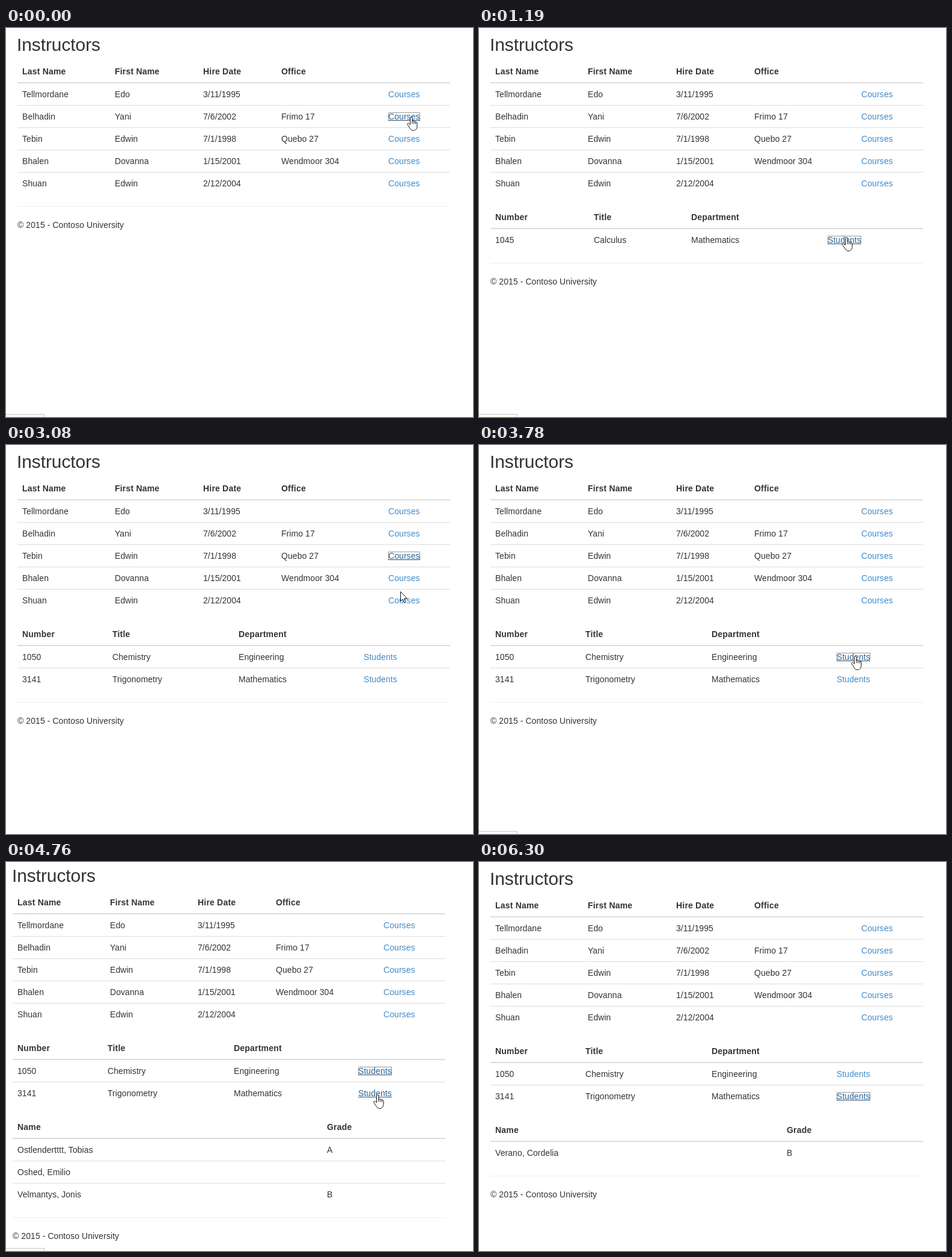
An HTML page that plays this animation: 777 by 646 pixels, repeating every 6580 ms.

```html
<!DOCTYPE html>
<html lang="en">
<head>
<meta charset="utf-8">
<title>Instructors</title>
<style>
html, body { margin: 0; width: 100%; height: 100%; overflow: hidden; background: #fff; }
svg { display: block; font: 14px "Liberation Sans", Arial, sans-serif; fill: #333; letter-spacing: .07px; }
.title { font-size: 30px; letter-spacing: -.1px; }
.head { font-weight: 700; letter-spacing: .2px; }
</style>
</head>
<body>
<svg id="stage" width="777" height="646"></svg>
<script>
const LOOP = 6580, STEP = 70;
const stage = document.getElementById('stage');

const instructors = {
  cols: [27.2, 181.2, 327.6, 457.6, 636.2],
  head: ['Last Name', 'First Name', 'Hire Date', 'Office'],
  rows: [
    ['Tellmordane', 'Edo', '3/11/1995', ''],
    ['Belhadin', 'Yani', '7/6/2002', 'Frimo 17'],
    ['Tebin', 'Edwin', '7/1/1998', 'Quebo 27'],
    ['Bhalen', 'Dovanna', '1/15/2001', 'Wendmoor 304'],
    ['Shuan', 'Edwin', '2/12/2004', '']
  ],
  link: 'Courses', linkWidth: 53
};
const courses = (cols, ...rows) => ({
  cols, rows, head: ['Number', 'Title', 'Department'], link: 'Students', linkWidth: 56
});
const grades = (gradeX, ...rows) => ({ cols: [27.2, gradeX], rows, head: ['Name', 'Grade'] });

const calculus = courses([27.2, 191.2, 352.6, 580.2], ['1045', 'Calculus', 'Mathematics']);
const sciences = courses([27.2, 177.2, 387.2, 594.6],
  ['1050', 'Chemistry', 'Engineering'], ['3141', 'Trigonometry', 'Mathematics']);
const single = grades(512.2, ['Verano, Cordelia', 'B']);
const several = grades(542.2,
  ['Ostlendertttt, Tobias', 'A'], ['Oshed, Emilio', ''], ['Velmantys, Jonis', 'B']);

// [start time, value]
const pages = [
  [0, [instructors]],
  [140, [instructors, calculus]],
  [1330, [instructors, calculus, single]],
  [2520, [instructors, sciences]],
  [3920, [instructors, sciences, several]],
  [5530, [instructors, sciences, single]]
];
const focuses = [
  [0, 'Courses1'], [1190, 'Students0'], [2380, 'Courses2'], [3780, 'Students0'], [5390, 'Students1']
];
const statusFills = [
  [0, '#f9f9f9'], [280, ''], [1120, '#fdfdf3'], [3010, ''],
  [3710, '#f9f9f9'], [4200, ''], [4760, '#f9f9f9'], [6020, '']
];
// [time, x, y] of the pointer's hot spot
const pointerKeys = [
  [140, 674, 148], [770, 614, 341], [980, 611, 348], [1610, 611, 348],
  [2030, 683, 205], [2170, 679, 181], [2310, 672, 185], [2800, 672, 185],
  [3500, 626, 350], [3570, 626, 351], [3920, 626, 351], [4550, 618, 386],
  [4690, 618, 387], [5180, 618, 387], [5250, 618, 386], [5810, 618, 386], [6300, 754, 656]
];
const POINTER_GONE = 6300;

const HAND = 'M5.5 13.5V2.3a1.7 1.7 0 0 1 3.4 0V8c.5-1 2.6-.9 2.9.5c.7-.9 2.5-.6 2.7.8' +
  'c.9-.7 2.5 0 2.5 1.5V16c0 4-2.5 7.3-6 7.3c-3 0-4.5-1.3-6-4L1 13.4c-.8-1.7 1-3 2.4-1.8z' +
  'M8.9 8v4M11.8 8.5v3.8M14.5 9.3v3.2';
const ARROW = 'M.5 .5V16.5l3.7-3.5 2.5 5.8 2.4-1-2.5-5.7h5z';

const current = (list, t) => list.filter(([start]) => start <= t).pop()[1];

function pointerAt(t) {
  const next = pointerKeys.findIndex(([time]) => time > t);
  if (next < 1) return pointerKeys.at(next).slice(1);
  const [t0, x0, y0] = pointerKeys[next - 1], [t1, x1, y1] = pointerKeys[next];
  const u = (t - t0) / (t1 - t0), k = u * u * (3 - 2 * u);
  return [Math.round(x0 + (x1 - x0) * k), Math.round(y0 + (y1 - y0) * k)];
}

const text = (x, y, string, attrs = '') => `<text x="${x}" y="${y}" ${attrs}>${string}</text>`;
const bar = (x, y, width, height, fill) =>
  `<rect x="${x}" y="${y}" width="${width}" height="${height}" fill="${fill}"/>`;

function draw(t) {
  const tables = current(pages, t), focus = current(focuses, t), status = current(statusFills, t);
  const [px, py] = pointerAt(t);
  // The tallest page gets a scrollbar: content moves left and is scrolled a little.
  const scrolled = tables.includes(several);
  const dx = scrolled ? 8.4 : 0, dy = scrolled ? -5 : 0;
  const left = Math.round(19.2 - dx);
  let hovering = false, y = 72 + dy;
  let out = text(left - 1, 38 + dy, 'Instructors', 'class="title"');

  function link(x, mid, table, index) {
    const width = table.linkWidth;
    const hover = px >= x && px < x + width && Math.abs(py - mid) <= 8 && t < POINTER_GONE;
    const focused = focus === table.link + index;
    const color = hover || focused ? '#2a6496' : '#428bca';
    hovering ||= hover;
    out += text(x, mid + 5, table.link, `fill="${color}"`);
    if (hover || focused) out += bar(x, mid + 6, width, 1, color);
    if (focused) out += `<rect x="${x + .5}" y="${mid - 6.5}" width="${width - 1}" height="13"
      fill="none" stroke="#333" stroke-dasharray="1" stroke-dashoffset=".5"/>`;
  }

  for (const table of tables) {
    const cols = table.cols.map(x => Math.round(x - dx));
    table.head.forEach((label, i) => out += text(cols[i], y + 5, label, 'class="head"'));
    out += bar(left, y + 18, 720, 2, '#ddd');
    y += 38;
    table.rows.forEach((row, r) => {
      const mid = y + 37 * r;
      if (r) out += bar(left, mid - 19, 720, 1, '#ddd');
      row.forEach((cell, i) => out += text(cols[i], mid + 5, cell));
      if (table.link) link(cols.at(-1), mid, table, r);
    });
    y += 37 * (table.rows.length - 1) + 56;
  }
  out += bar(left, y - 18, 720, 1, '#eee') + text(left, y + 18, '© 2015 - Contoso University');

  if (status) out += `<rect x="-1.5" y="641.5" width="65" height="9" fill="${status}" stroke="#c8c8c8"/>`;
  if (t < POINTER_GONE) {
    const [x, top, shape] = hovering ? [px - 7, py - 1, HAND] : [px, py, ARROW];
    out += `<path transform="translate(${x} ${top})" d="${shape}" fill="#fff" stroke="#111"
      stroke-linejoin="round"/>`;
  }
  stage.innerHTML = out;
}

let shown = -1;
function tick() {
  const t = Math.floor(performance.now() % LOOP / STEP) * STEP;
  if (t !== shown) draw(shown = t);
  requestAnimationFrame(tick);
}
tick();
</script>
</body>
</html>
```
